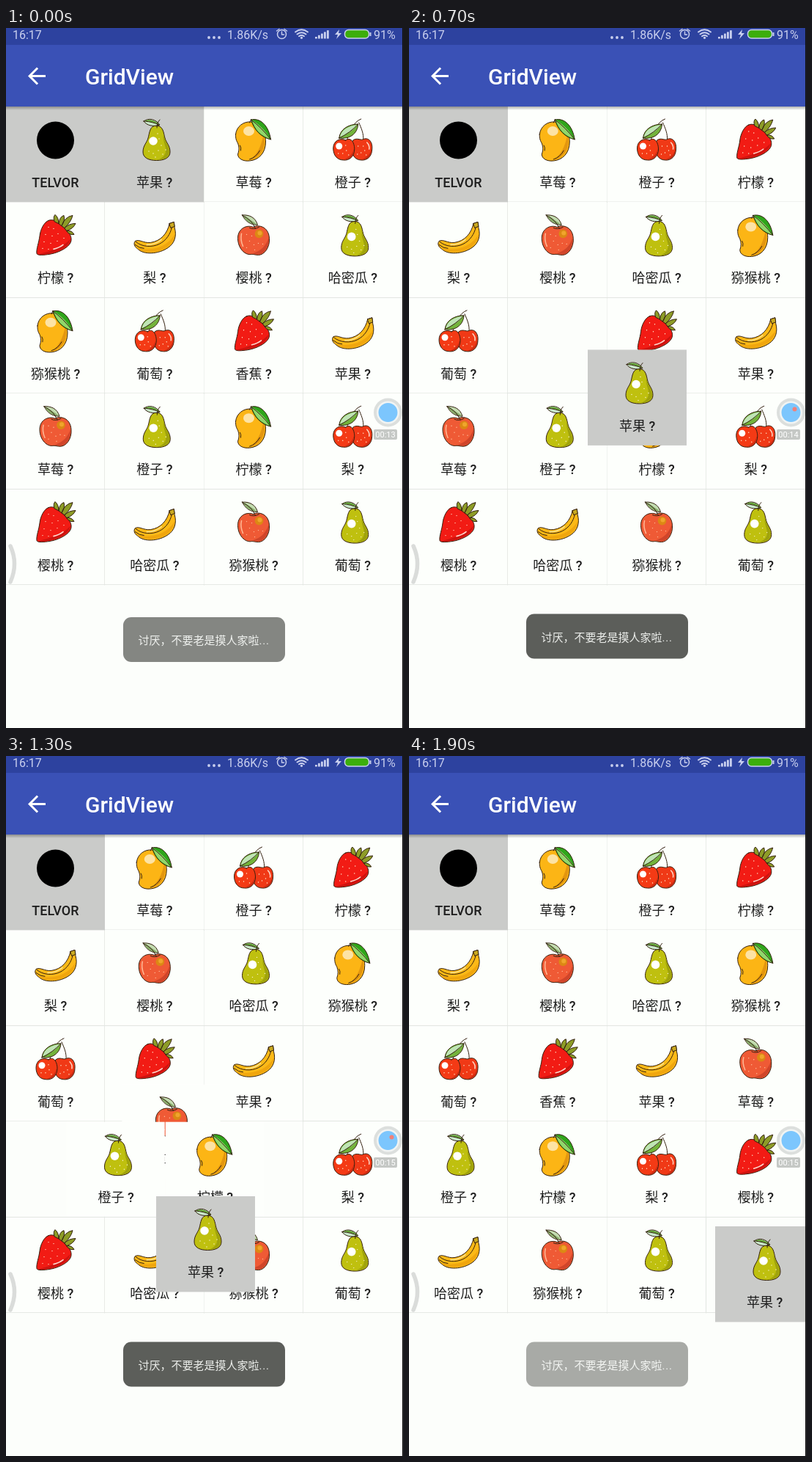
These frames come from a looping animation (542x954 px, 2000 ms). An HTML page:

```html
<!DOCTYPE html>
<html lang="zh-CN">
<head>
<meta charset="utf-8">
<title>GridView</title>
<style>
  html, body { margin: 0; width: 100%; height: 100%; overflow: hidden; background: #fcfefb; }
  svg { display: block; width: 542px; height: 954px; }
  text { font-family: Roboto, "Noto Sans CJK SC", "Noto Sans CJK", sans-serif; }
  .label { font-size: 18px; fill: #1e1e1e; text-anchor: middle; }
  .label tspan, .bold { font-weight: 500; }
  .status { font-size: 16px; fill: #c9cfee; }
  .toast { font-size: 15px; fill: #eceeeb; }
  .toast tspan { letter-spacing: 0.8px; }
  .ink { stroke: #33200f; stroke-width: 1; stroke-linejoin: round; stroke-linecap: round; }
  .line { fill: none; stroke-linecap: round; stroke-linejoin: round; }
</style>
</head>
<body>
<svg id="stage" viewBox="0 0 542 954" xmlns="http://www.w3.org/2000/svg"></svg>
<script>
const LOOP = 2000, STEP = 100, SLIDE = 270;
const CELL_W = 135.25, CELL_H = 130.4, TOP = 107;
const DRAGGED = 1;

const shape = (d, fill) => `<path class="ink" d="${d}" fill="${fill}"/>`;
const tint = (d, fill) => `<path d="${d}" fill="${fill}"/>`;
const line = (d, color = '#33200f', width = 1) =>
  `<path class="line" d="${d}" stroke="${color}" stroke-width="${width}"/>`;
const disc = (x, y, r, fill) => `<circle cx="${x}" cy="${y}" r="${r}" fill="${fill}"/>`;
const rect = (x, y, w, h, fill, more = '') =>
  `<rect x="${x}" y="${y}" width="${w}" height="${h}" fill="${fill}" ${more}/>`;
const specks = (d, color = '#fff4d8') => line(d, color, 1.4);

const icons = {
  phone: disc(67.5, 46, 25.5, '#000'),

  pear:
    shape('M70 26C61 26 61 36 59 43C57 50 52 53 52 62C52 70 60 73.5 70.5 73.5C81 73.5 89 70 89 62C89 53 84 50 82 43C80 36 80 26 70 26Z', '#bfc00f') +
    tint('M80 38C82 48 88 54 88 62C88 69 80 73 71 73C80 70 84 65 83 57C82 51 79 46 80 38Z', '#a0a30c') +
    shape('M53 20C60 15 69 17 75 25C66 28 57 26 53 20Z', '#c9e8cb') +
    tint('M54 20C61 20 68 22 75 25C69 19 60 16 54 20Z', '#62a234') +
    line('M54 20Q66 21 74 25M71 29Q71 22 75 18') +
    disc(66, 47, 5.8, '#fff') +
    specks('M60 61h0M66 64h0M73 60h0M77 53h0M72 37h0M79 65h0M69 69h0M83 59h0M74 44h0'),

  mango:
    shape('M43 38C44 27 54 20 64 21C77 22 84 34 84 48C84 64 74 73 62 74C53 75 46 71 46 65C48 59 48 56 46 50C43 45 43 42 43 38Z', '#fcb515') +
    tint('M81 38C85 51 81 68 63 73C71 66 78 56 81 38Z', '#e3960f') +
    line('M76 60Q71 69 62 72M49 53Q51 56 50 60') +
    `<ellipse cx="61" cy="33.5" rx="7.5" ry="6.5" fill="#fde3a4"/>` +
    shape('M64 18C77 15 88 26 91 45C78 42 68 32 64 18Z', '#2fa51b') +
    tint('M65 18C76 25 84 33 90 44C77 40 69 31 65 18Z', '#91d66b') +
    line('M64 18Q78 28 91 45M64 18L62 22'),

  cherry:
    line('M59 48C63 35 68 21 79 17M82 46C83 37 79 29 76 22') +
    shape('M49 43C50 31 62 24 75 24C74 37 64 45 49 43Z', '#73b33b') +
    tint('M50 42C52 31 63 26 74 25C69 32 61 37 50 42Z', '#bfe4b5') +
    line('M49 43Q64 36 75 24') +
    shape('M68 46C73 42 78 46 81 45C89 41 95 48 94 58C94 68 87 74 79 73C70 73 65 64 66 55Z', '#f03916') +
    shape('M58 46C64 41 70 48 70 58C70 68 63 74 55 73C46 73 41 66 41 57C41 47 50 42 58 46Z', '#f43a15') +
    tint('M69 58C70 68 62 73 55 72.5C62 70 67 66 69 58ZM93 58C94 68 86 73 79 72.5C86 70 91 66 93 58Z', '#c82a12') +
    disc(49, 54, 4.5, '#fff') + line('M87 49Q91 53 90 58', '#ffd2c0', 1.6) +
    specks('M54 64h0M59 60h0M62 66h0M58 53h0M48 64h0M75 54h0M79 63h0M84 60h0M82 54h0M74 65h0M86 66h0'),

  strawberry:
    shape('M58 25C52 27 47 37 46 46C45 55 41 64 42 70C43 73 52 72 59 71C72 69 88 61 89 52C90 45 84 39 78 33C72 27 64 22 58 25Z', '#f21b14') +
    tint('M88 50C86 61 72 67 59 70C52 71.5 47 72 44 71C62 66 79 61 88 50Z', '#cd130f') +
    shape('M66 26Q64 20 67 17Q72 21 72 29ZM72 29Q73 20 79 18Q81 25 76 32ZM76 32Q80 20 91 18Q89 27 80 35ZM80 35Q86 29 95 29Q92 36 83 39ZM83 39Q90 38 93 44Q88 45 85 42Z', '#8d9c27') +
    line('M65 64Q73 62 78 58', '#ffd9cf', 1.6) +
    specks('M58 34h0M65 36h0M54 44h0M63 46h0M71 43h0M52 54h0M61 56h0M70 53h0M79 49h0M50 63h0M58 64h0'),

  banana:
    shape('M88 29L94 27L95 35C98 46 95 56 86 62C73 71 53 72 45 64C39 60 39 56 41 53C47 50 52 56 62 55C76 53 85 43 88 29Z', '#fcb917') +
    tint('M95 44C94 59 77 69 59 68C51 67 46 65 43 62C62 68 85 61 95 44Z', '#f0a60e') +
    shape('M88 29L94 27L95 33L90 35Z', '#c9a920') +
    line('M42 54C50 61 64 62 74 57C84 52 89 43 91 35M41 58Q47 63 53 63') +
    line('M57 58Q69 58 77 51', '#ffe08b', 1.6),

  apple:
    shape('M67 34C74 30 88 33 89 49C90 62 82 72 74 72C70 72 68 71 65 71C56 73 46 63 46 49C46 36 58 30 67 34Z', '#ef5a35') +
    tint('M88 48C90 61 81 71 74 71C70 71 68 70 66 70C78 66 85 59 88 48Z', '#d0452a') +
    shape('M52 17.5C61 17 70 20 73 31C63 31 56 26 52 17.5Z', '#c3dcb0') +
    tint('M53 18C61 23 67 26 72 30C64 30 57 26 53 18Z', '#86ab68') +
    line('M52 18Q65 23 70 36M62 35Q68 38 75 34') +
    disc(75, 43, 5.8, '#dc8814') + disc(76, 42, 3, '#f0a52c') +
    line('M51 43Q49 51 53 60', '#ffb592', 1.6) +
    specks('M58 44h0M62 53h0M58 62h0M68 58h0M74 56h0M69 65h0M80 57h0M65 46h0', '#ffc29e')
};

const cycle = ['pear', 'mango', 'cherry', 'strawberry', 'banana', 'apple'];
const names = '草莓 橙子 柠檬 梨 樱桃 哈密瓜 猕猴桃 葡萄 香蕉 苹果'.split(' ');
const items = Array.from({ length: 20 }, (_, i) => ({
  icon: i ? cycle[(i - 1) % 6] : 'phone',
  name: i ? names[(i + 8) % 10] : 'TELVOR'
}));

function cell({ icon, name }, i) {
  const grey = i <= DRAGGED;
  const back = grey ? rect(0, 0, 135, 130.4, '#cacbc9') : rect(0, 0.5, 134.2, 129, '#fdfffc');
  const label = i
    ? `<text class="label" x="67.6" y="110">${name}<tspan> ?</tspan></text>`
    : `<text class="label bold" x="67.4" y="110">${name}</text>`;
  return `<g id="cell${i}">${back}${icons[icon]}${label}</g>`;
}

function gridLines() {
  let d = '';
  for (let c = 1; c < 4; c++) d += `M${Math.round(c * CELL_W) - 0.5} ${TOP}V759`;
  for (let r = 1; r < 6; r++) d += `M0 ${Math.round(TOP + r * CELL_H) - 0.5}H541`;
  return line(d, '#e3e6e2');
}

function statusBar() {
  const c = '#c9cfee';
  const bars = [0, 1, 2, 3, 4].map(i => rect(422 + i * 4, 12 - i * 2.2, 2.8, 2.5 + i * 2.2, c)).join('');
  const note = (x, s) => `<text class="status" x="${x}" y="14.5">${s}</text>`;
  return rect(0, 0, 542, 23, '#2d429f') +
    note(9, '16:17') + note(302, '1.86K/s') + note(502, '91%') +
    [277, 284, 291].map(x => disc(x, 13, 1.9, c)).join('') +
    `<circle cx="376.5" cy="8.5" r="6" fill="none" stroke="${c}" stroke-width="1.5"/>` +
    line('M376.5 5V9H379.5M369.5 4L373 1.5M383.5 4L380 1.5', c, 1.4) +
    line('M395 5.5Q403.5 -1 412 5.5M397.5 8.5Q403.5 4 409.5 8.5M400 11.3Q403.5 8.8 407 11.3', c, 1.9) +
    disc(403.5, 13.3, 1.6, c) + bars +
    tint('M455 2L449 9H453L451 15L458 7H454Z', c) +
    rect(462.5, 2.5, 33, 11.5, '#3cae0c', `rx="5" stroke="${c}" stroke-width="1.5"`) +
    rect(496.5, 6, 2, 5, c);
}

const appBar = rect(0, 23, 542, 84, '#3a51b6') +
  `<path transform="translate(24 47.5) scale(1.5)" fill="#fff" d="M20 11H7.83l5.59-5.59L12 4l-8 8 8 8 1.41-1.41L7.83 13H20z"/>` +
  `<text class="bold" x="108" y="76.5" font-size="30" fill="#fff">GridView</text>` +
  rect(0, 107, 542, 5, 'url(#shade)');

const recorder =
  disc(521.5, 524, 19.5, '#dcdfdd') + disc(521.5, 524, 15.5, '#f1f4f3') + disc(521.5, 524, 13, '#7cc6fd') +
  `<circle id="blink" cx="526.5" cy="519.5" r="3" fill="#f08079"/>` +
  rect(502, 547, 32, 14, '#c5c8c5', 'rx="2"') +
  `<text id="clock" x="518" y="558" font-size="11" fill="#fff" text-anchor="middle"></text>`;

const toast = `<g id="toast">${rect(160, 798.5, 221, 61, '#5c5e5a', 'rx="11"')}
  <text class="toast" x="180.5" y="835.5">讨厌，不要老是摸人家啦<tspan>...</tspan></text></g>`;

document.getElementById('stage').innerHTML =
  `<defs><linearGradient id="shade" x2="0" y2="1"><stop stop-color="#000" stop-opacity=".3"/>
   <stop offset="1" stop-color="#000" stop-opacity="0"/></linearGradient></defs>` +
  rect(0, 0, 542, 954, '#fcfefb') + gridLines() +
  items.map((item, i) => i === DRAGGED ? '' : cell(item, i)).join('') +
  cell(items[DRAGGED], DRAGGED) +
  statusBar() + appBar +
  line('M6 706Q17 730 6 755', '#dadcda', 5.5) + recorder + toast +
  rect(541, 0, 1, 954, '#111');

const get = id => document.getElementById(id);
const cells = items.map((_, i) => get('cell' + i));
const blink = get('blink'), clock = get('clock'), toastBox = get('toast');

// [last item shifted, start time]
const shifts = [[5, 310], [9, 420], [10, 760], [11, 939], [14, 1184], [17, 1327], [18, 1457], [19, 1590]];
// [time, x, y] of the dragged cell
const drag = [[0, 135, 107], [100, 134, 122], [300, 129, 273], [400, 136, 350], [700, 244, 438.5],
  [900, 322, 425], [1100, 379.5, 399.5], [1200, 313, 485], [1300, 205, 600], [1400, 227, 672.5],
  [1600, 419, 647.5], [1700, 418, 641], [2000, 418, 641]];
// [time, opacity, drop] of the toast
const fade = [[0, 0.75, 4.5], [100, 0.95, 1], [200, 1, 0], [1700, 1, 0], [1800, 0.85, 0], [1900, 0.52, 0], [2000, 0.1, 0]];

const clamp = v => Math.max(0, Math.min(1, v));
const ease = v => (1 - Math.cos(Math.PI * clamp(v))) / 2;
const place = (el, x, y) => el.setAttribute('transform', `translate(${x.toFixed(2)} ${y.toFixed(2)})`);
const slot = i => [i % 4 * CELL_W, TOP + Math.floor(i / 4) * CELL_H];

function track(keys, t) {
  const n = keys.findIndex(k => k[0] > t);
  const [a, b] = [keys[n - 1], keys[n]];
  const k = (t - a[0]) / (b[0] - a[0]);
  return [1, 2].map(j => a[j] + (b[j] - a[j]) * k);
}

function render(now) {
  const t = Math.floor(now % LOOP / STEP) * STEP;
  cells.forEach((el, i) => {
    if (i === DRAGGED) return place(el, ...track(drag, t));
    let [x, y] = slot(i);
    if (i > DRAGGED) {
      const start = shifts.find(s => i <= s[0])[1];
      const k = ease((t - start) / SLIDE);
      const [tx, ty] = slot(i - 1);
      x += (tx - x) * k;
      y += (ty - y) * k;
    }
    place(el, x, y);
  });
  const [alpha, drop] = track(fade, t);
  toastBox.setAttribute('opacity', alpha);
  place(toastBox, 0, drop);
  blink.setAttribute('visibility', t >= 500 && t < 1700 ? 'visible' : 'hidden');
  clock.textContent = '00:' + (t < 200 ? 13 : t < 1300 ? 14 : 15);
}

let origin;
function tick(now) {
  origin ??= now;
  render(now - origin);
  requestAnimationFrame(tick);
}
render(0);
requestAnimationFrame(tick);
</script>
</body>
</html>
```
